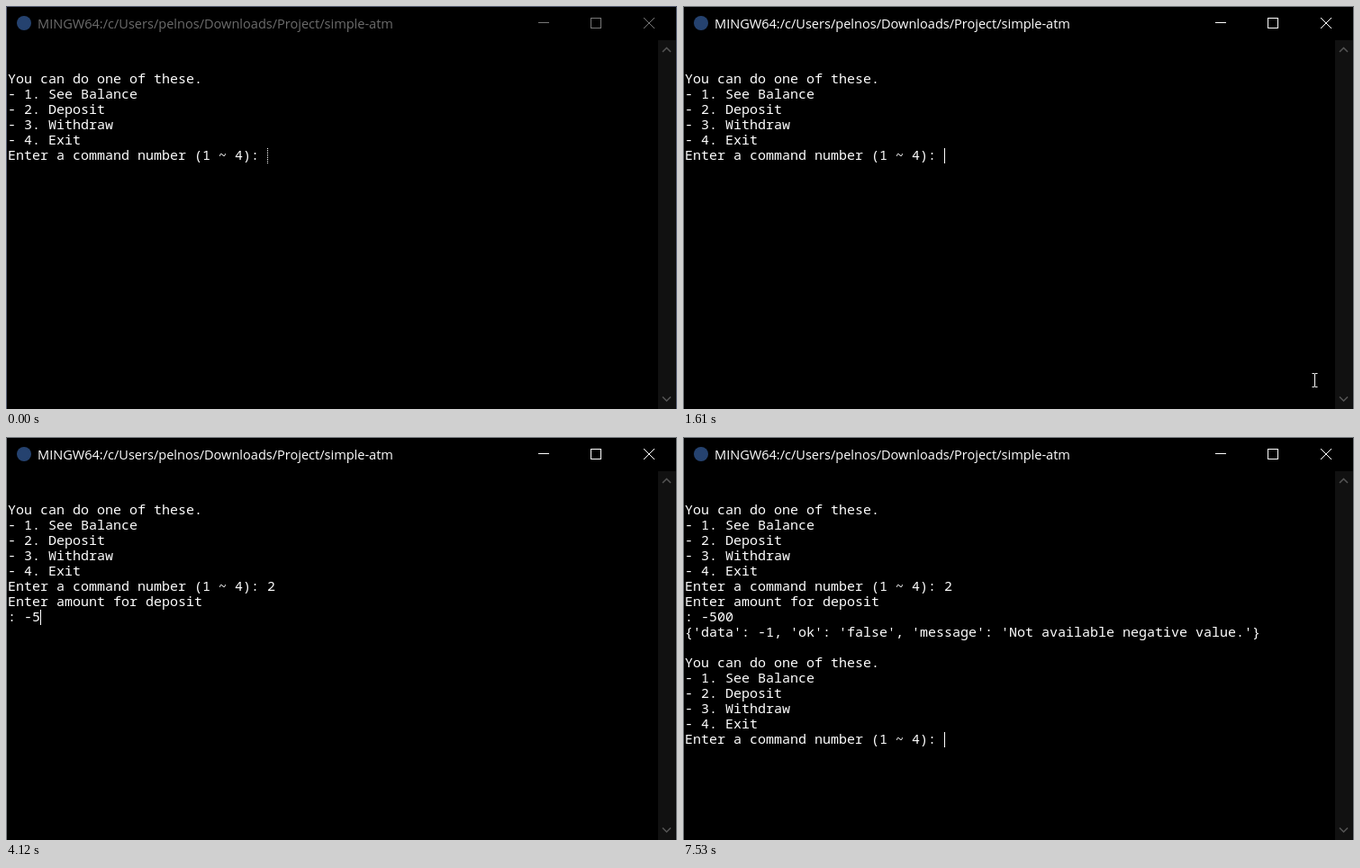
An HTML page that plays this animation: 745 by 448 pixels, repeating every 8000 ms.

```html
<!DOCTYPE html>
<html lang="en">
<head>
<meta charset="utf-8">
<title>Terminal</title>
<style>
  html, body { margin: 0; width: 100%; height: 100%; overflow: hidden; background: #000; }
  svg { display: block; width: 745px; height: 448px; }
  path { fill: none; }
  #term text { font: 15px "Noto Sans Mono", monospace; fill: #fff; white-space: pre; }
  #title { font: 14.56px "Open Sans", "Noto Sans", sans-serif; }
</style>
</head>
<body>
<svg viewBox="0 0 745 448">
  <rect width="745" height="448"/>
  <path id="edge" d="M.5 448V.5H744.5V448"/>
  <circle cx="20" cy="19" r="8" fill="#25426f"/>
  <text id="title" x="35" y="25">MINGW64:/c/Users/pelnos/Downloads/Project/simple-atm</text>
  <g id="buttons">
    <path d="M591 18.5h12M649.5 13.5h11v11h-11z" shape-rendering="crispEdges"/>
    <path d="M708 13l12 12m0-12l-12 12"/>
  </g>
  <rect x="724" y="38" width="20" height="410" fill="#111"/>
  <path d="M729 51l4.5-4.5 4.5 4.5M729 434.5l4.5 4.5 4.5-4.5" stroke="#555" stroke-width="1.5"/>
  <g id="term"></g>
  <path id="caret" d="M.5 0v17" stroke="#fff"/>
  <path id="mouse" d="M-3-7.5h2.5l.5.5.5-.5h2.5M0-7v14M-3 7.5h2.5l.5-.5.5.5h2.5" stroke="#fff"/>
  <circle id="click" cx="699" cy="415" r="15" fill="#fff000" fill-opacity=".49"/>
</svg>
<script>
const LOOP = 8000, ROW = 17, COL = 9, LEFT = 2, TOP = 73;
const $ = id => document.getElementById(id);

const menu = `You can do one of these.
- 1. See Balance
- 2. Deposit
- 3. Withdraw
- 4. Exit
Enter a command number (1 ~ 4): `;

// [time, text added]
const output = [
  [0, menu],
  [1810, "2"],
  [2070, "\nEnter amount for deposit\n: "],
  [3660, "-"],
  [4120, "5"],
  [4390, "0"],
  [4520, "0"],
  [5400, "\n"],
  [5470, "{'data': -1, 'ok': 'false', 'message': 'Not available negative value.'}\n\n" + menu],
];
const caretOff = [[1060, 1610], [2600, 3130], [5050, 5400], [5940, 6530], [7000, 7530]];

const rows = Array.from({ length: 16 }, (_, i) => {
  const row = document.createElementNS("http://www.w3.org/2000/svg", "text");
  row.setAttribute("x", LEFT);
  row.setAttribute("y", TOP + 13 + i * ROW);
  return $("term").appendChild(row);
});

const within = (t, a, b) => t >= a && t < b;
const show = (id, on) => $(id).setAttribute("visibility", on ? "visible" : "hidden");
const stroke = (id, color) => $(id).setAttribute("stroke", color);
const move = (id, x, y) => $(id).setAttribute("transform", `translate(${x} ${y})`);

function draw(t) {
  const active = t >= 530;
  $("title").setAttribute("fill", active ? "#fff" : "#6c6c6c");
  stroke("buttons", active ? "#fff" : "#777");
  stroke("edge", active ? "#7c8084" : "#5c6478");

  const lines = output.filter(([at]) => t >= at).map(([, s]) => s).join("").split("\n");
  rows.forEach((row, i) => {
    const line = lines[i] || "";
    if (row.textContent !== line) row.textContent = line;
  });

  const last = lines.length - 1;
  move("caret", LEFT + lines[last].length * COL, TOP + last * ROW);
  $("caret").setAttribute("stroke-dasharray", active ? "none" : "1 1");
  show("caret", !caretOff.some(([a, b]) => within(t, a, b)));

  show("click", within(t, 530, 730));
  show("mouse", within(t, 260, 1810));
  if (t < 330) move("mouse", 703.5, 437);
  else move("mouse", 701.5, 416);
}

function tick() {
  draw(performance.now() % LOOP);
  requestAnimationFrame(tick);
}
tick();
</script>
</body>
</html>
```
